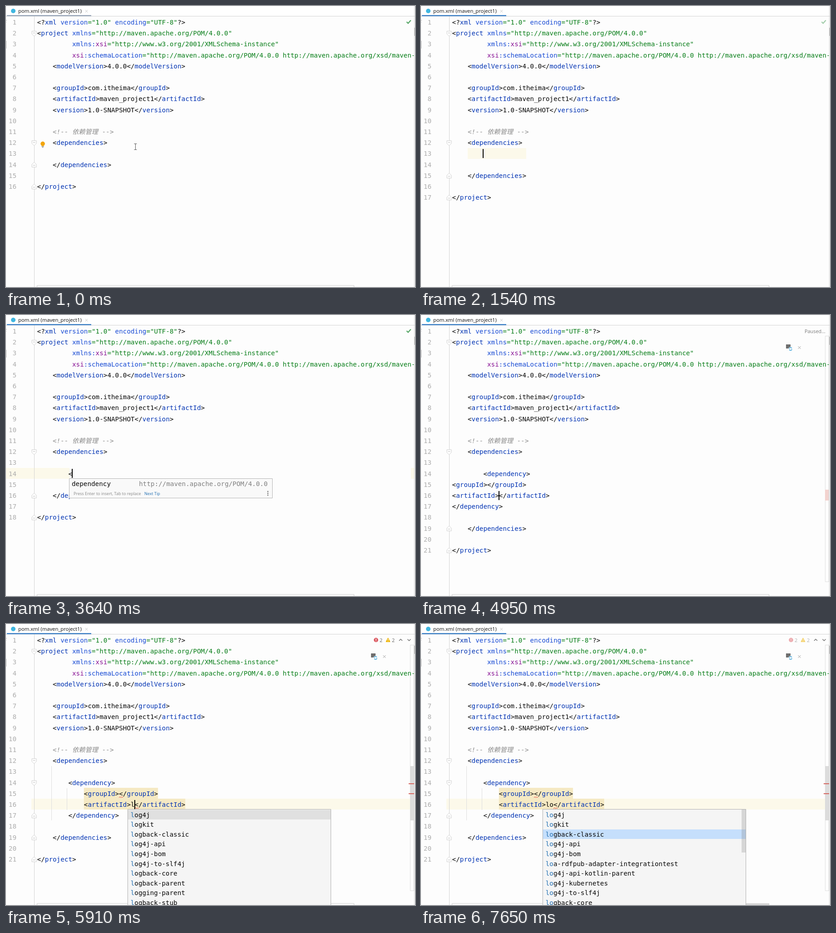
Write an HTML page with a canvas that moves like this. It is 902 px wide and 621 px high and loops after 8 s.

```html
<!DOCTYPE html>
<html>
<head>
<meta charset="utf-8">
<style>
html, body { margin: 0; width: 100%; height: 100%; overflow: hidden; background: #fdfdfd; }
canvas { display: block; }
</style>
</head>
<body>
<canvas id="stage" width="902" height="621"></canvas>
<script>
const ctx = document.getElementById('stage').getContext('2d');
const LOOP = 8000, X0 = 68.6, CHAR = 8.6, ROW = 24.2;
const MONO = '14.29px "DejaVu Sans Mono", "Noto Sans CJK SC", "Noto Sans CJK", monospace';
const ui = size => `${size}px "Open Sans", sans-serif`;

const colX = col => X0 + col * CHAR;
const rowTop = row => 23.3 + ROW * (row - 1);
const baseline = row => 41 + ROW * (row - 1);

const HEAD = [
  '<?xml version="1.0" encoding="UTF-8"?>',
  '<project xmlns="http://maven.apache.org/POM/4.0.0"',
  '         xmlns:xsi="http://www.w3.org/2001/XMLSchema-instance"',
  '         xsi:schemaLocation="http://maven.apache.org/POM/4.0.0 http://maven.apache.org/xsd/maven-4.0.0.xsd"',
  '    <modelVersion>4.0.0</modelVersion>',
  '',
  '    <groupId>com.itheima</groupId>',
  '    <artifactId>maven_project1</artifactId>',
  '    <version>1.0-SNAPSHOT</version>',
  '',
  '    <!-- 依赖管理 -->',
  '    <dependencies>'
];
const TAIL = ['    </dependencies>', '', '</project>'];

const TOKENS = /(?<note><!--.*)|(?<value>="[^"]*")|(?<space>xsi)|(?<tag>(?<=<[\/?]?)\w+)|(?<attr>:?\w+:?(?==|xsi))|(?<plain><[\/?]?|[^\s<=>]+|\S)/g;
const COLORS = { note: '#8c8c8c', value: '#067d17', space: '#871094', tag: '#0033b3', attr: '#174ad4', plain: '#080808' };

const LIST_L = ['log4j', 'logkit', 'logback-classic', 'log4j-api', 'log4j-bom', 'log4j-to-slf4j',
  'logback-core', 'logback-parent', 'logging-parent', 'logback-stub'];
const LIST_LO = ['log4j', 'logkit', 'logback-classic', 'log4j-api', 'log4j-bom', 'loa-rdfpub-adapter-integrationtest',
  'log4j-api-kotlin-parent', 'log4j-kubernetes', 'log4j-to-slf4j', 'logback-core'];

function rect(x, y, w, h, color) {
  ctx.fillStyle = color;
  ctx.fillRect(x, y, w, h);
}
function text(str, x, y, color, font = MONO, align = 'left') {
  ctx.font = font;
  ctx.textAlign = align;
  ctx.fillStyle = color;
  ctx.fillText(str, x, y);
}
function path(points, color, width = 1, fill) {
  ctx.beginPath();
  for (let i = 0; i < points.length; i += 2) ctx.lineTo(points[i], points[i + 1]);
  if (fill) { ctx.closePath(); ctx.fillStyle = fill; ctx.fill(); }
  ctx.strokeStyle = color;
  ctx.lineWidth = width;
  ctx.stroke();
}
function disc(x, y, r, color) {
  ctx.beginPath();
  ctx.arc(x, y, r, 0, 7);
  ctx.fillStyle = color;
  ctx.fill();
}
function cross(x, y, r, color) {
  path([x - r, y - r, x + r, y + r], color);
  path([x - r, y + r, x + r, y - r], color);
}
function faded(alpha, draw) {
  ctx.globalAlpha = alpha;
  draw();
  ctx.globalAlpha = 1;
}

const typed = t => t < 5670 ? '' : t < 6050 ? 'l' : 'lo';

function body(t) {
  if (t < 1140) return [''];
  if (t < 3080) return ['', ''];
  if (t < 4950) return ['', t < 3480 ? '' : t < 4050 ? '        <' : '        <dependency', ''];
  const pad = n => ' '.repeat(t < 5120 ? 0 : n);
  return ['', '        <dependency>', pad(12) + '<groupId></groupId>',
    pad(12) + `<artifactId>${typed(t)}</artifactId>`, pad(8) + '</dependency>', ''];
}

function caret(t) {
  if (t < 150 || t >= 2120 && t < 2660 || t >= 6620 && t < 7150 || t >= 7650) return null;
  if (t < 1140) return [18, 12];
  if (t < 3080) return [8, 13];
  if (t < 4950) return [t < 3480 ? 8 : t < 4050 ? 9 : 19, 14];
  return [(t < 5120 ? 12 : 24) + typed(t).length, 16];
}

function codeLine(line, row) {
  for (const m of line.matchAll(TOKENS)) {
    const kind = Object.keys(COLORS).find(k => m.groups[k]);
    text(m[0], colX(m.index), baseline(row), COLORS[kind], (kind === 'note' ? 'italic ' : '') + MONO);
  }
}

function fold(row, dir) {
  const y = 36.5 + ROW * (row - 1);
  path([57, y - 5 * dir, 67, y - 5 * dir, 67, y + 1 * dir, 62, y + 6 * dir, 57, y + 1 * dir, 57, y - 5 * dir], '#cfcfcf', 1, '#fff');
  path([59.5, y - dir, 64.5, y - dir], '#bdbdbd');
}

function squiggle(col, row) {
  const points = [], y = baseline(row) + 3;
  for (let i = 0; i <= 4; i++) points.push(colX(col) + i * 2.2, y + (i % 2 ? -1 : 1));
  path(points, '#e53935');
}

function highlights(t, closeRow) {
  const line = (x1, x2, row) => rect(x1, Math.round(rowTop(row)), x2 - x1, 24, '#fcf9ea');
  const tag = (from, to, row) => rect(colX(from), Math.round(rowTop(row)), (to - from) * CHAR, 24, '#f5e9c3');
  if (t >= 490 && t < 1540) {
    tag(4, 18, 12);
    tag(4, 19, closeRow);
  } else if (t >= 1540 && t < 3080) {
    line(103, 232, 13);
  } else if (t >= 3080 && t < 3640) {
    line(0, 900, 14);
  } else if (t >= 3640 && t < 4950) {
    line(0, 140, 14);
    line(893, 900, 14);
  } else if (t >= 5420) {
    line(56, 891, 16);
    tag(12, 31, 15);
    tag(12, 37 + typed(t).length, 16);
    rect(100, 314, 1, 120, '#dedede');
    rect(134, 363, 1, 48, '#dedede');
  }
}

function frame(t) {
  rect(0, 0, 902, 621, '#fdfdfd');
  rect(0, 0, 902, 22, '#fff');
  rect(0, 22, 902, 1, '#d1d1d1');
  rect(2, 20, 186, 2.5, t < 150 ? '#9ca9bb' : '#4083c9');
  disc(16, 11, 5, '#40b6e0');
  text('pom.xml (maven_project1)', 27, 15, '#111', ui(11.28));
  cross(177.5, 11.5, 2.7, '#c4c4c4');
}

function editor(t) {
  const middle = body(t), lines = [...HEAD, ...middle, ...TAIL];
  const closeRow = HEAD.length + middle.length + 1;
  highlights(t, closeRow);

  rect(62, 23, 1, 598, '#d4d4d4');
  path([68.5, 621, 68.5, 617.5, 767.5, 617.5, 767.5, 621], '#d0d0d0');
  if (t >= 6050) rect(716, 617, 51, 4, '#d8d8d8');
  rect(0, 77, 1, 17, '#bdbdbd');
  rect(0, 31, 2, 1, '#bbb');
  rect(0, 35, 1, 1, '#bbb');
  scrollbar(t);

  ctx.save();
  ctx.beginPath();
  ctx.rect(0, 23, 899.5, 598);
  ctx.clip();
  lines.forEach((line, i) => {
    text(i + 1, 23, baseline(i + 1), '#adadad', MONO, 'right');
    codeLine(line, i + 1);
  });
  ctx.restore();

  fold(2, 1);
  fold(12, 1);
  fold(closeRow, -1);
  fold(closeRow + 2, -1);
  if (t >= 5420) {
    fold(14, 1);
    fold(17, -1);
    squiggle(21, 15);
    squiggle(24 + typed(t).length, 16);
  }

  const pos = caret(t);
  if (pos) rect(Math.round(colX(pos[0])) - 1, Math.round(rowTop(pos[1]) + 2.4), 2, 20, '#000');
}

function scrollbar(t) {
  rect(900, 0, 1, 621, '#d6d6d6');
  rect(900, 48, 2, 18, '#bdbdbd');
  if (t < 4950) return;
  path([899.5, 46.5, 891.5, 46.5, 891.5, 589.5, 899.5, 589.5, 899.5, 46.5], '#dedede');
  if (t < 5420) {
    rect(891, 386, 8, 24, '#f3d3cf');
  } else {
    rect(891, 314, 8, 120, '#dcdcdc');
    for (const y of [352, 374]) rect(888, y, 12, 2, '#d5655f');
  }
}

function status(t) {
  if (t < 4170) {
    const weak = t >= 1140 && t < 1670 || t >= 3080 && t < 3640 || t >= 4050;
    faded(weak ? 0.55 : 1, () => path([883.5, 35, 886.8, 38.2, 892.8, 31.5], '#59a869', 2.4));
  } else if (t < 5790) {
    text('Paused...', 846, 39.5, '#7a7a7a', ui(10.9));
  } else {
    faded(t < 6050 ? 1 : 0.5, () => {
      disc(816, 35.3, 4.8, '#db5860');
      rect(815.3, 32.3, 1.4, 3.8, '#fff');
      rect(815.3, 37, 1.4, 1.4, '#fff');
      path([842.5, 30.8, 847, 39.3, 838, 39.3], '#edb200', 1, '#edb200');
      rect(841.9, 33.2, 1.3, 3.2, '#fff');
      rect(841.9, 37.2, 1.3, 1.3, '#fff');
      for (const x of [824, 851]) text('2', x, 39.5, '#666', ui(11));
    });
    path([867, 37, 870.5, 33.5, 874, 37], '#6e6e6e', 1.4);
    path([885.5, 33.5, 889, 37, 892.5, 33.5], '#6e6e6e', 1.4);
  }
  if (t >= 3900) {
    rect(805, 65, 10, 9, '#6e6e6e');
    disc(815, 75, 4.6, '#fdfdfd');
    ctx.strokeStyle = '#389fd6';
    ctx.lineWidth = 1.5;
    for (const a of [0.2, 3.34]) {
      ctx.beginPath();
      ctx.arc(815, 75, 3.1, a, a + 2.5);
      ctx.stroke();
    }
    cross(834.5, 72, 3, '#a0a0a0');
  }
}

function tagPopup() {
  path([139.5, 361.5, 587.5, 361.5, 587.5, 404.5, 139.5, 404.5, 139.5, 361.5], '#b4b4b4', 1, '#f9f9f9');
  text('dependency', 145, 378, '#080808');
  text('http://maven.apache.org/POM/4.0.0', 577, 378, '#808080', MONO, 'right');
  text('Press Enter to insert, Tab to replace', 149, 397.5, '#888', ui(9.06));
  text('Next Tip', 305, 397.5, '#2470b3', ui(9.06));
  for (const y of [390, 394, 398]) disc(577.5, y, 1.3, '#6e6e6e');
}

function artifactPopup(t) {
  const updated = t >= 6620, prefix = typed(t).length;
  const selected = t < 6750 ? 0 : t < 6880 ? 1 : 2;
  const rowY = i => 410.6 + 21.55 * i;
  rect(268, 409, 449, 212, '#f5f5f5');
  rect(269, Math.round(rowY(selected)), 447, 21, selected ? '#c5dffc' : '#e0e0e0');
  (updated ? LIST_LO : LIST_L).forEach((name, i) => {
    const y = rowY(i) + 16.2;
    text(name.slice(0, prefix), 274.7, y, '#2470b3');
    text(name.slice(prefix), 274.7 + prefix * CHAR, y, '#080808');
  });
  if (updated) rect(707, 410, 9, 95, 'rgba(120,120,120,.25)');
  path([268.5, 621, 268.5, 409.5, 716.5, 409.5, 716.5, 621], '#b0b0b0');
}

function pointer(x, y) {
  path([x - 3, y - 6.5, x + 3, y - 6.5], '#555');
  path([x, y - 6.5, x, y + 6.5], '#555');
  path([x - 3, y + 6.5, x + 3, y + 6.5], '#555');
}

function bulb() {
  disc(81, 304.3, 4.8, '#f2a50c');
  rect(78.5, 306, 5, 3.5, '#f2a50c');
  rect(78.5, 310, 5, 1, '#6e6e6e');
  rect(79.5, 312, 3, 1, '#6e6e6e');
}

function draw(now) {
  const t = now % LOOP;
  frame(t);
  editor(t);
  status(t);
  if (t < 150) bulb();
  if (t < 1140) t < 150 ? pointer(285.5, 311) : pointer(391.5, 319);
  if (t >= 3640 && t < 4420) tagPopup();
  if (t >= 5910) artifactPopup(t);
}

const start = performance.now();
function tick() {
  draw(performance.now() - start);
  requestAnimationFrame(tick);
}
tick();
</script>
</body>
</html>
```
